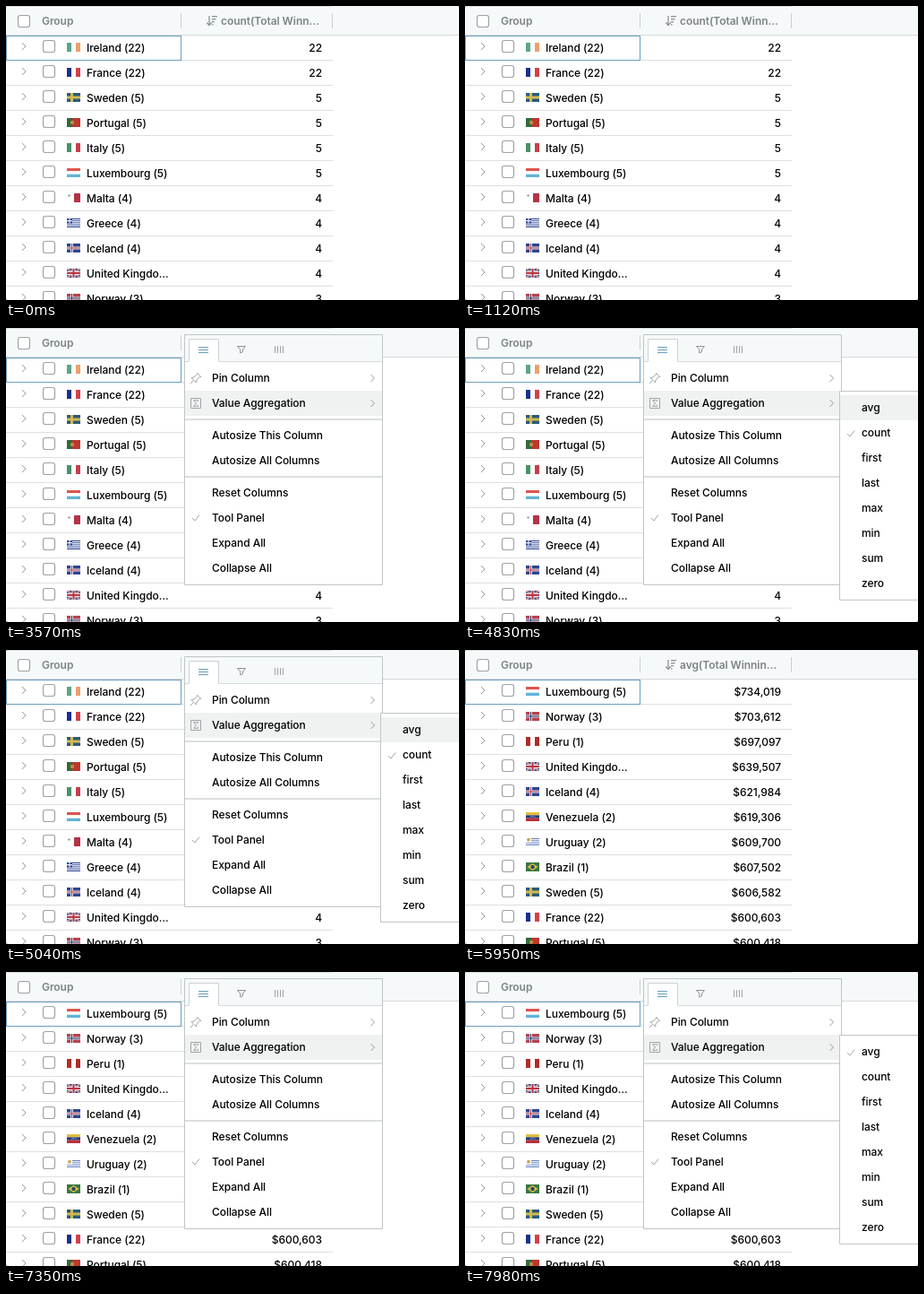
These frames come from a looping animation (506x328 px, 8 s). An HTML page with a canvas:

```html
<!DOCTYPE html>
<html lang="en">
<head>
<meta charset="utf-8">
<title>Grouped grid with column menu</title>
<style>
  html, body { margin: 0; width: 100%; height: 100%; overflow: hidden; background: #a5a5a5; }
  canvas { display: block; width: 506px; height: 328px; }
</style>
</head>
<body>
<canvas id="stage" width="506" height="328"></canvas>
<script>
const ctx = document.getElementById('stage').getContext('2d');
const LOOP = 8000, ROW = 28;
const FONT = 'Inter, Roboto, "Open Sans", sans-serif';
const INK = '#000', GREY = '#8c9195', SOFT = '#a0a5a8', LINE = '#d5d9db', PANEL = '#f6f9f9', HOVER = '#f0f2f2';

// Drawing helpers
function rect(color, x, y, w, h) {
  ctx.fillStyle = color;
  ctx.fillRect(x, y, w, h);
}

function frame(color, x, y, w, h) {
  ctx.strokeStyle = color;
  ctx.lineWidth = 1;
  ctx.strokeRect(x + 0.5, y + 0.5, w - 1, h - 1);
}

function path(color, width, ...points) {
  ctx.strokeStyle = color;
  ctx.lineWidth = width;
  ctx.beginPath();
  points.forEach(([x, y]) => ctx.lineTo(x, y));
  ctx.stroke();
}

function shape(color, ...points) {
  ctx.fillStyle = color;
  ctx.beginPath();
  points.forEach(([x, y]) => ctx.lineTo(x, y));
  ctx.fill();
}

function disc(color, x, y, r) {
  ctx.fillStyle = color;
  ctx.beginPath();
  ctx.arc(x, y, r, 0, Math.PI * 2);
  ctx.fill();
}

function text(str, x, baseline, { color = INK, weight = 500, align = 'left' } = {}) {
  ctx.font = `${weight} 12px ${FONT}`;
  ctx.letterSpacing = '-0.06px';
  ctx.textAlign = align;
  ctx.fillStyle = color;
  ctx.fillText(str, x, baseline);
}

const chevron = (x, y, size) =>
  path('#969b9f', 1, [x, y - size], [x + size, y], [x, y + size]);

const check = (x, y) =>
  path(SOFT, 1, [x, y], [x + 3, y + 3], [x + 8, y - 3.5]);

function bars(color, x, y, w) {
  for (let i = 0; i < 3; i++) rect(color, x, y + i * 3, w, 1);
}

function checkbox(x, y) {
  ctx.strokeStyle = '#9ea3a6';
  ctx.lineWidth = 1.2;
  ctx.beginPath();
  ctx.roundRect(x + 0.5, y + 0.5, 13, 13, 2.5);
  ctx.fillStyle = '#fff';
  ctx.fill();
  ctx.stroke();
}

// Flags, each drawn in a 15 x 10 box
const vertical = (...colors) => () =>
  colors.forEach((c, i) => rect(c, i * 5, 0, 5, 10));

const horizontal = (...colors) => () =>
  colors.forEach((c, i) => rect(c, 0, i * 10 / 3, 15, 10 / 3));

const nordic = (field, cross, inner) => () => {
  rect(field, 0, 0, 15, 10);
  rect(cross, 4, 0, 3, 10);
  rect(cross, 0, 3.5, 15, 3);
  if (!inner) return;
  rect(inner, 5, 0, 1, 10);
  rect(inner, 0, 4.5, 15, 1);
};

const flags = {
  Ireland: vertical('#5aa585', '#fff', '#eba06a'),
  France: vertical('#17308f', '#fff', '#d2404a'),
  Italy: vertical('#47936a', '#fff', '#c4404a'),
  Peru: vertical('#b02d26', '#fff', '#b02d26'),
  Luxembourg: horizontal('#dc564f', '#fff', '#62b4d6'),
  Sweden: nordic('#2a5a7c', '#d3b94f'),
  Iceland: nordic('#2b4690', '#dddfea', '#c23f4a'),
  Norway: nordic('#b8424c', '#dedde4', '#2c3a70'),
  Portugal() {
    rect('#bd3830', 0, 0, 15, 10);
    rect('#336b3d', 0, 0, 6, 10);
    disc('#cfae45', 6, 5, 2);
    disc('#c9604d', 6, 5, 1);
  },
  Malta() {
    rect('#fff', 0, 0, 8, 10);
    rect('#b53345', 8, 0, 7, 10);
    rect('#a9a5a7', 1, 2, 3, 1);
    rect('#a9a5a7', 2, 1, 1, 3);
  },
  Greece() {
    for (let i = 0; i < 9; i++) rect(i % 2 ? '#f2f3f8' : '#2c4494', 0, i * 10 / 9, 15, 10 / 9);
    rect('#2c4494', 0, 0, 6, 5.5);
    rect('#fff', 2.5, 0, 1, 5.5);
    rect('#fff', 0, 2.2, 6, 1.1);
  },
  'United Kingdom'() {
    rect('#2e3c72', 0, 0, 15, 10);
    for (const [color, width] of [['#d9d6df', 2], ['#bd4552', 0.8]]) {
      path(color, width, [0, 0], [15, 10]);
      path(color, width, [0, 10], [15, 0]);
    }
    rect('#e9e6ea', 5.5, 0, 4, 10);
    rect('#e9e6ea', 0, 3, 15, 4);
    rect('#bd3443', 6.5, 0, 2, 10);
    rect('#bd3443', 0, 4, 15, 2);
  },
  Venezuela() {
    horizontal('#dfbf3e', '#28397c', '#b83237')();
    for (let i = 0; i < 5; i++) rect('#d6dcec', 5 + i * 1.2, 4.8 - Math.sin(i * Math.PI / 4) * 0.8, 0.7, 0.8);
  },
  Uruguay() {
    for (let i = 0; i < 9; i++) rect(i % 2 ? '#4f72b4' : '#fff', 0, i * 10 / 9, 15, 10 / 9);
    rect('#fff', 0, 0, 6, 5.5);
    disc('#c9a850', 3, 2.7, 1.9);
  },
  Brazil() {
    rect('#397742', 0, 0, 15, 10);
    shape('#d9c145', [1.5, 5], [7.5, 1], [13.5, 5], [7.5, 9]);
    disc('#2b4575', 7.5, 5, 2.2);
  },
};

// Data: [country, winners, shown value]
const byCount = {
  title: 'count(Total Winn…',
  rows: [
    ['Ireland', 22], ['France', 22], ['Sweden', 5], ['Portugal', 5], ['Italy', 5], ['Luxembourg', 5],
    ['Malta', 4], ['Greece', 4], ['Iceland', 4], ['United Kingdom', 4], ['Norway', 3],
  ],
};

const byAverage = {
  title: 'avg(Total Winnin…',
  rows: [
    ['Luxembourg', 5, '$734,019'], ['Norway', 3, '$703,612'], ['Peru', 1, '$697,097'],
    ['United Kingdom', 4, '$639,507'], ['Iceland', 4, '$621,984'], ['Venezuela', 2, '$619,306'],
    ['Uruguay', 2, '$609,700'], ['Brazil', 1, '$607,502'], ['Sweden', 5, '$606,582'],
    ['France', 22, '$600,603'], ['Portugal', 5, '$600,418'],
  ],
};

const menuItems = [
  ['Pin Column', 56], ['Value Aggregation', 84],
  ['Autosize This Column', 120], ['Autosize All Columns', 148],
  ['Reset Columns', 184], ['Tool Panel', 212], ['Expand All', 240], ['Collapse All', 268],
];
const aggregations = ['avg', 'count', 'first', 'last', 'max', 'min', 'sum', 'zero'];

// Each step changes part of the state from its time on
const steps = [
  [0, { data: byCount, checked: 'count', icon: false, menu: false, hover: null, sub: false, subHover: null }],
  [2660, { icon: true }],
  [2800, { menu: true }],
  [3150, { hover: 'Pin Column' }],
  [3220, { hover: 'Value Aggregation' }],
  [3710, { sub: true }],
  [3850, { subHover: 'avg' }],
  [5180, { data: byAverage, checked: 'avg', icon: false, menu: false, hover: null, sub: false, subHover: null }],
  [6370, { icon: true }],
  [6440, { menu: true }],
  [6860, { hover: 'Pin Column' }],
  [6930, { hover: 'Value Aggregation' }],
  [7420, { sub: true }],
];

const stateAt = t =>
  Object.assign({}, ...steps.filter(([start]) => start <= t).map(([, change]) => change));

function drawHeader({ data, icon }) {
  rect(PANEL, 0, 0, 506, 32);
  rect('#dfe3e4', 0, 0, 365, 1);
  rect(LINE, 0, 32, 506, 1);
  checkbox(13, 10);
  const style = { color: '#7d8387', weight: 600 };
  text('Group', 40, 21, style);
  text(data.title, 240, 21, style);
  rect('#cbd0d2', 195, 8, 1, 17);
  rect('#cbd0d2', 364, 8, 1, 17);
  if (icon) bars(GREY, 211, 13, 10);

  path(GREY, 1.3, [227, 11], [227, 21]);
  path(GREY, 1.3, [224.3, 18.5], [227, 21.5], [229.7, 18.5]);
  [6, 4.5, 3, 1.5].forEach((w, i) => rect(GREY, 230, 11 + i * 3, w, 1.3));
}

function drawRow([country, winners, value = winners], i) {
  const cy = 46 + i * ROW;
  rect('#dde0e1', 0, cy + 14, 365, 1);
  chevron(18, cy - 1, 4);
  checkbox(41, cy - 8);
  ctx.save();
  ctx.translate(68, cy - 5);
  ctx.beginPath();
  ctx.rect(0, 0, 15, 10);
  ctx.clip();
  flags[country]();
  ctx.restore();
  const label = country === 'United Kingdom' ? 'United Kingdo…' : `${country} (${winners})`;
  text(label, 90, cy + 5);
  text(value, 353, cy + 5, { align: 'right' });
}

function drawTabs() {
  rect(PANEL, 200, 8, 220, 29);
  rect(LINE, 200, 37, 220, 1);
  rect('#fff', 204, 12, 34, 26);
  path('#ccd1d4', 1, [204.5, 37.5], [204.5, 12.5], [237.5, 12.5], [237.5, 37.5]);
  bars('#6a9fbd', 215, 21, 11);
  ctx.lineJoin = 'round';
  path(GREY, 1, [258.5, 20.5], [267.5, 20.5], [264.5, 24], [264.5, 26.7], [261.8, 28], [261.8, 24], [258.5, 20.5]);
  for (let i = 0; i < 4; i++) rect(SOFT, 300 + i * 3, 20, 1, 8);
}

function drawMenu({ hover }) {
  rect('#fff', 199, 7, 222, 280);
  drawTabs();
  for (const [label, cy] of menuItems) {
    if (label === hover) rect(HOVER, 200, cy - 14, 220, ROW);
    text(label, 230, cy + 4);
  }
  [102, 166].forEach(y => rect('#b9bfc2', 200, y - 0.5, 220, 1));
  chevron(407.5, 56, 4);
  chevron(407.5, 84, 4);
  check(208, 212);

  path(SOFT, 1, [206, 62], [209.5, 58.5]);
  path(SOFT, 1, [207, 55.5], [212.5, 61], [213, 57.8], [216.5, 54.5], [217.8, 54.5],
    [213.5, 50.2], [213.5, 51.5], [210.2, 55], [207, 55.5]);

  frame(SOFT, 206, 78, 12, 12);
  path(SOFT, 1, [214.5, 82], [214.5, 80.7], [209.7, 80.7], [212.5, 84], [209.7, 87.3], [214.5, 87.3], [214.5, 86]);
  frame('#bfc5c8', 199, 7, 222, 280);
}

function drawSubmenu({ checked, subHover }) {
  rect('#fff', 418, 70, 92, 234);
  aggregations.forEach((name, i) => {
    const cy = 89 + i * ROW;
    if (name === subHover) rect(HOVER, 419, cy - 14, 90, ROW);
    if (name === checked) check(427, cy + 1);
    text(name, 443, cy + 4);
  });
  frame('#bfc5c8', 418, 70, 92, 234);
}

function draw(t) {
  const state = stateAt(t);
  ctx.clearRect(0, 0, 506, 328);
  ctx.save();
  ctx.beginPath();
  ctx.roundRect(0, 0, 506, 328, 3);
  ctx.clip();
  rect('#fff', 0, 0, 506, 328);
  drawHeader(state);
  state.data.rows.forEach(drawRow);
  frame('#6a9fc0', 0, 33, 196, 28);
  if (state.menu) drawMenu(state);
  if (state.sub) drawSubmenu(state);
  ctx.restore();
}

const begin = performance.now();
function tick() {
  draw((performance.now() - begin) % LOOP);
  requestAnimationFrame(tick);
}
tick();
</script>
</body>
</html>
```
